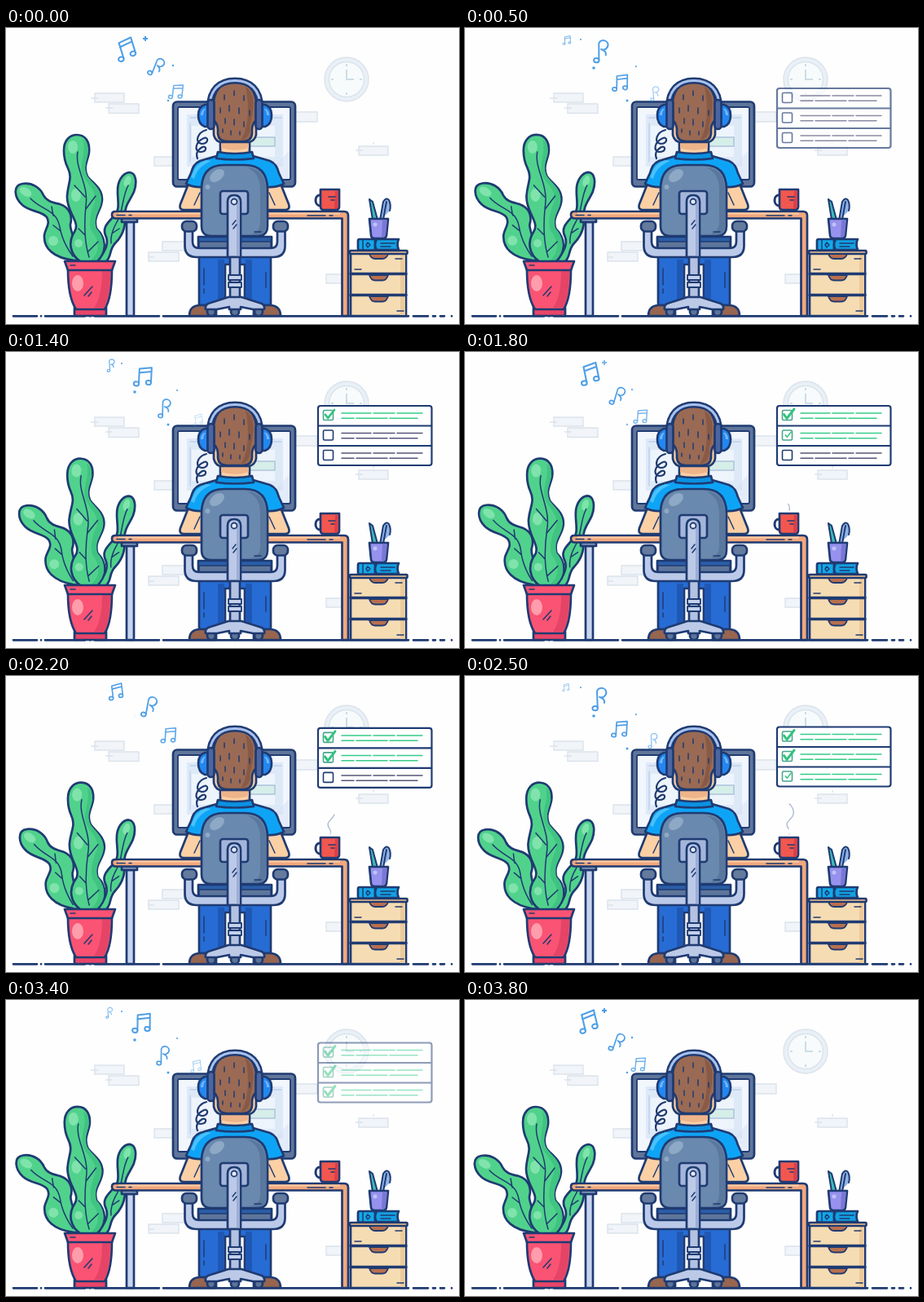
An HTML page for the animation above (3900 ms loop, 556x363 px).

```html
<!DOCTYPE html>
<html lang="en">
<head>
<meta charset="utf-8">
<title>Working at the desk</title>
<style>
html, body { margin: 0; width: 100%; height: 100%; overflow: hidden; background: #fefefe; }
svg { display: block; }
.ink { stroke: #1f3b72; stroke-width: 2.7; stroke-linejoin: round; stroke-linecap: round; }
.thin { fill: none; stroke-width: 1.5; }
.flat { stroke: none; }
.pale { fill: #f1f4f8; stroke: #dce3ec; stroke-width: 1.4; }
.note { fill: none; stroke: #4f9fe6; stroke-width: 2; stroke-linejoin: round; stroke-linecap: round; }
</style>
</head>
<body>
<svg width="556" height="363" viewBox="0 0 556 363">
  <g class="pale">
    <path d="M109 80h36v11h-36zM126 93h37v11.500h-37zM182 158h24v11h-24zM192 262h37v11h-37zM175 275h37v11h-37zM350 103h32v12h-32zM433 145h36v11h-36zM393 302h20v11h-20z"/>
    <path d="M104 86h9M122 98h9M429 150h9M174 281h8M451 140v3" fill="none"/>
    <circle cx="418" cy="63" r="27" fill="#e9f0f6"/>
    <circle cx="418" cy="63" r="21.500" fill="#f7fbfc"/>
    <path d="M418 51V63H427M418 44v3M418 79v3M399 63h3M434 63h3" fill="none" stroke="#cddde6" stroke-width="2"/>
  </g>

  <g id="panel" class="ink" fill="#fff">
    <rect x="383" y="66" width="139.500" height="73" rx="3" stroke-width="2.200"/>
    <path d="M383 90.500h139M383 115h139" stroke-width="2.200"/>
    <g id="rows"></g>
  </g>
  <path id="steam" class="thin" stroke="#b3bed2" stroke-linecap="round" pathLength="72" d="M398 194C401 187 392 186 396 179C400 174 406 171 402 162C399 154 391 155 389 160C388 165 391 168 394 167"/>

  <g class="ink" fill="#50d28c">
    <g id="leafL">
      <path d="M84 285C58 282 46 270 47 254C48 246 55 240 50 232C44 224 30 226 20 217C10 208 8 193 20 191C32 189 42 196 46 205C50 213 58 214 66 216C78 220 82 230 79 241C78 250 90 268 90 285Z"/>
      <ellipse class="flat" cx="24" cy="201" rx="8" ry="5" fill="#80e3ac" transform="rotate(30 24 201)"/>
      <circle class="flat" cx="58" cy="261" r="6" fill="#80e3ac"/>
      <path class="thin" d="M30 209C44 224 62 222 66 244Q69 262 82 280M56 219L58 230M58 242L67 249"/>
    </g>
    <g id="leafR">
      <path d="M113 286C119 276 128 266 122 254C118 244 126 238 132 231C143 222 134 204 138 191C141 181 147 177 152 177C160 178 161 190 157 201C152 212 145 218 146 232C147 246 142 256 134 264C126 272 130 282 122 287Z"/>
      <ellipse class="flat" cx="149" cy="188" rx="4" ry="7" fill="#80e3ac" transform="rotate(20 149 188)"/>
      <path class="thin" d="M150 193C142 208 144 226 136 238Q128 252 129 264M142 224L138 229M139 246L130 252"/>
    </g>
    <g id="leafC">
      <path d="M92 287C78 278 76 262 84 250C92 238 74 226 75 206C76 190 82 184 76 172C72 164 71 158 71 150C71 138 78 131 87 131C97 131 103 139 102 152C101 162 94 170 100 182C106 190 118 196 118 210C118 224 106 230 111 246C122 256 126 274 110 287Z"/>
      <path class="flat" d="M94 137C100 152 88 168 95 182C101 193 112 200 109 213C104 226 101 238 105 249C115 260 116 276 103 286H110C124 274 121 256 111 246C106 230 117 224 117 210C117 197 106 190 100 182C94 170 100 162 101 152C101 145 99 139 94 137Z" fill="#3fc481"/>
      <ellipse class="flat" cx="82" cy="146" rx="6" ry="8" fill="#80e3ac"/><ellipse class="flat" cx="86" cy="205" rx="6" ry="8" fill="#80e3ac"/><circle class="flat" cx="89" cy="264" r="5" fill="#80e3ac"/>
      <path class="thin" d="M88 152C84 172 102 192 98 218C96 238 96 262 102 281M84 193L97 207M110 206L98 222M89 246L97 254M113 262L101 274"/>
    </g>
    <path d="M84 343H123V353H84Z" fill="#e84468"/>
    <path d="M76 296H130C130 318 127 336 121 345H86C80 336 76 318 76 296Z" fill="#fa5374"/>
    <path class="flat" d="M118 298H128C128 318 125 335 120 343H108C115 334 118 318 118 298Z" fill="#e54467"/>
    <ellipse class="flat" cx="88" cy="313" rx="7" ry="10" fill="#ff9dac"/>
    <path d="M72 286H134L130 297H76Z" fill="#fa5374"/>
    <path class="thin" d="M96 328L106 317M101 329L105 324M79 291h6"/>
  </g>

  <g class="ink" fill="#60759a">
    <rect x="205" y="90.500" width="150" height="104" rx="5"/>
    <rect x="211" y="97" width="138" height="89" rx="2" fill="#e4ecf9" stroke-width="1.800"/>
    <g class="flat">
      <path d="M212 98H300L220 185H212ZM330 98H348V150L315 185H250Z" fill="#f2f6fd"/>
      <path d="M222 106H340V170H222Z" fill="#d3e1f5" opacity=".6"/>
      <path d="M228 120H330V158H228Z" fill="#eef4fc"/>
    </g>
    <path class="thin" d="M226 110H338M226 117V164" stroke="#bfd1ea"/>
    <rect x="276" y="134" width="54" height="11" fill="#d6eee8" stroke="#adc4dc" stroke-width="1.500"/>
    <path fill="none" stroke-width="2.200" d="M246 125C235 128 231 140 240 142C249 142 249 133 243 135C232 140 231 150 238 152C247 152 247 144 241 146C234 150 233 155 235 160"/>
  </g>

  <g id="sparkA" fill="#4a9fe8">
    <path d="M170 10h2v2h2v2h-2v2h-2v-2h-2v-2h2z"/>
    <circle cx="199" cy="89" r="1.200"/><circle cx="205" cy="46" r="1.200"/>
  </g>
  <g id="sparkB" fill="#4a9fe8">
    <circle cx="142" cy="14" r="1"/><circle cx="158" cy="49" r="1.800"/><circle cx="199" cy="89" r="1.500"/><circle cx="210" cy="47" r="1"/>
  </g>
  <g id="notes"></g>

  <g class="ink" fill="#f2a77c">
    <path fill="#c8d4ee" d="M148 238H157V353H148Z"/>
    <path fill="#7d90b5" d="M142 233H161V238H142Z"/>
    <path d="M134 225H415Q420 225 420 230V353H412.500V233.500H134Q130 233 130 229Q130 225 134 225Z"/>
    <path class="flat" d="M138 226.500H410V228.500H138Z" fill="#ffcba6"/>
    <path class="thin" d="M136 229.500h10M151 229.500h3M370 230h22M397 230h4"/>
  </g>

  <g class="ink" fill="#f2574f">
    <path fill="none" d="M386 205C378 204 378 218 386 218" stroke-width="3"/>
    <path d="M386 198H409V219Q409 223 405 223H390Q386 223 386 219Z"/>
    <path class="flat" d="M404 200h4v18q0 4-5 4z" fill="#d9404a"/>
    <path class="thin" d="M396 207h8M399 211h4"/>
  </g>

  <g class="ink" fill="#f6dcb3">
    <path d="M423 276H491V353H423Z"/>
    <path class="flat" d="M484 278h6v74h-6z" fill="#ebcb9b"/>
    <rect x="422" y="273" width="70.500" height="4" rx="1" fill="#f2c48f"/>
    <path d="M423 301.500H491M423 327.500H491" stroke-width="3.400"/>
    <path d="M446 277H469Q467 283 462 283H453Q448 283 446 277ZM446 303H469Q467 309.500 462 309.500H453Q448 309.500 446 303ZM446 329H469Q467 335.500 462 335.500H453Q448 335.500 446 329Z" fill="#b96f4e" stroke-width="1.800"/>
    <path class="thin" d="M428 296h8M478 283h8M480 347h8"/>
    <rect x="432" y="259" width="21" height="13.500" rx="2" fill="#12a9ea"/>
    <path d="M455 259H482Q479 265 482 272H455Q451 266 455 259Z" fill="#12a0e2"/>
    <path class="thin" d="M438 260v12M460 264h17M460 268h12"/>
    <path class="thin" d="M444 263l3 3l-3 3l-2-3z" fill="#fff"/>
    <path d="M446 210L450 213L456 235H450Z" fill="#3fb9b8" stroke-width="2"/>
    <path d="M459 236L463 213Q467 207 470 211Q473 217 471 224M467 213L463 235" fill="#8fb4e8" stroke-width="2"/>
    <path d="M446 234H469L467 254Q467 258 462 258H453Q448 258 448 254Z" fill="#9692ee"/>
    <path class="flat" d="M462 236h6l-2 18q-1 3-5 3z" fill="#7b77d4"/>
    <circle class="flat" cx="453" cy="241" r="2.500" fill="#c3c0fa"/>
  </g>

  <path class="ink" d="M9 353.300H38M43 353.300h.1M48 353.300H97M103 353.300h.1M109 353.300H188M193 353.300H494M500 353.300H518M524 353.300h3M533 353.300H538M547 353.300h.1"/>

  <g class="ink">
    <g fill="#fbd0a5">
      <path d="M224 191L214 216Q212 223 218 223H241V193ZM337 191L347 216Q349 223 343 223H320V193Z"/>
      <path class="thin" d="M238 202L231 217M323 202L330 217"/>
      <path d="M263 130H299V158H263Z"/>
      <path class="flat" d="M264 141h34v6q-17 6-34 0z" fill="#eeb48a"/>
    </g>
    <path fill="#0ea4f6" d="M262 156L238 163C231 166 229 171 227 178L221 191Q230 196 243 195H319Q332 196 341 191L335 178C333 171 331 166 324 163L300 156Z"/>
    <path class="flat" d="M246 162C234 166 231 172 227 183L231 185C234 174 240 168 252 163Z" fill="#48c1fd"/>
    <path fill="#0a91e2" d="M260 152Q281 156 302 152L304 160Q281 163 258 160Z"/>

    <path fill="#fbd0a5" d="M255 112V131Q257 139 264 140H298Q305 139 307 131V112Z"/>
    <path fill="#9a6a54" d="M255 100C253 78 264 65 281 65C298 65 309 78 307 100V113Q302 118 302 125V130Q301 139 291 139H271Q261 139 260 130V125Q260 118 255 113Z"/>
    <path class="flat" d="M294 72C309 82 303 104 300 118C300 130 297 136 288 137.500C298 125 299 94 294 72Z" fill="#885a46"/>
    <path class="thin" d="M268 82v6M280 77v6M292 83v6M263 98v6M274 95v7M286 98v7M299 101v6M269 111v6M280 112v7M292 115v6M266 124v4M276 126v5M287 127v4"/>
    <path fill="none" stroke-width="8" d="M250 97C250 76 262 64.500 281 64.500C300 64.500 312 76 312 97"/>
    <path fill="none" style="stroke:#a9c2ee;stroke-width:3" d="M250 97C250 76 262 64.500 281 64.500C300 64.500 312 76 312 97"/>
    <g id="cup">
      <path fill="#2387f2" d="M248 94H244Q236 97 236 107Q236 118 244 121H248Z"/>
      <path class="flat" d="M243 99q-4 3-4 8h3q0-5 3-8z" fill="#74b6fc"/>
      <rect x="247.500" y="88" width="8" height="36" rx="4" fill="#4a65a0"/>
    </g>
    <use href="#cup" transform="translate(562) scale(-1 1)"/>

    <path fill="#276cd4" d="M237 270H325V340H293V290H269V340H237Z"/>
    <path class="flat" d="M260 284h8v54h-8zM294 284h8v54h-8z" fill="#1f58b4"/>
    <path class="thin" d="M243 295v20M243 320v5M319 300v18"/>
    <path fill="#98654f" d="M225 353Q225 341 237 340H258V353ZM337 353Q337 341 325 340H304V353Z"/>

    <path fill="#2a5ea8" d="M236 256H326V270H236Z"/>
    <path fill="#5f769c" d="M237 262H325V270H237Z" stroke-width="1.600"/>
    <path fill="#bccaea" d="M219.500 246V267Q219.500 281 234 281H328Q342.500 281 342.500 267V246H333V262Q333 270 325 270H237Q229 270 229 262V246Z"/>
    <rect x="216" y="237" width="18" height="12.500" rx="5.500" fill="#647b9e"/>
    <rect x="328" y="237" width="18" height="12.500" rx="5.500" fill="#647b9e"/>
    <path fill="#6a89ae" d="M240 198Q240 168 268 168H293Q321 168 321 198V243Q321 255 309 255H252Q240 255 240 243Z"/>
    <path class="flat" d="M296 171Q319 173 319 198V243Q319 253 309 253H301Q312 249 312 239V198Q312 178 296 171Z" fill="#5a789e"/>
    <ellipse class="flat" cx="259" cy="181" rx="10" ry="6.500" fill="#8ea9c6" transform="rotate(-38 259 181)"/>
    <circle class="flat" cx="247.500" cy="195" r="3" fill="#8ea9c6"/>
    <path class="thin" d="M305 250h8"/>
    <rect x="263" y="200" width="34" height="28" rx="3" fill="#a3b5d9"/>
    <path fill="#bccae8" d="M272 213Q272 205 280 205Q288 205 288 213V281H272Z"/>
    <path class="flat" d="M283 208q4 2 4 6v66h-4z" fill="#9caed4"/>
    <circle cx="280" cy="213" r="3.500" fill="#e3ebf9" stroke-width="1.800"/>
    <path class="thin" d="M278 241l4-5M279 246l4-5"/>
    <path fill="#b3c2e2" d="M275 281H287V336H275Z"/>
    <path fill="#c3d0ec" d="M273 303H289V309H273ZM273 312H289V318H273Z" stroke-width="1.800"/>
    <g fill="#5d7398"><circle cx="252" cy="348" r="5"/><circle cx="281" cy="348" r="5"/><circle cx="310" cy="348" r="5"/></g>
    <path fill="#bccae8" d="M273 330H289L314 338Q318 340 317 345H303L288 342V345H274V342L259 345H245Q244 340 248 338Z"/>
  </g>
</svg>
<script>
const LOOP = 3900, GAP = LOOP / 4, FRAME = 100;
const CHECK_AT = [1150, 1700, 2400];
const $ = id => document.getElementById(id);
const clamp = v => Math.max(0, Math.min(1, v));

// Linear interpolation through rows of [time, value, value, ...].
function along(keys, t) {
  if (t <= keys[0][0]) return keys[0].slice(1);
  const i = keys.findIndex(k => k[0] >= t);
  if (i < 0) return keys[keys.length - 1].slice(1);
  const a = keys[i - 1], b = keys[i], p = (t - a[0]) / (b[0] - a[0]);
  return a.slice(1).map((v, j) => v + (b[j + 1] - v) * p);
}

// x, y, scale, rotation, opacity
const NOTE_PATH = [
  [0, 240, 87, .45, -12, 0], [200, 231, 79, .65, 0, .6], [600, 211, 79, .75, 10, .8],
  [1150, 191, 67, .85, 4, 1], [1600, 185, 48, .85, 26, 1], [2100, 167, 28, 1, 4, 1],
  [2600, 147, 26, 1.05, -14, 1], [2850, 135, 19, .8, -4, 1], [3100, 125, 15, .45, 0, .85],
  [3300, 120, 11, .2, 0, 0]
];
// y offset, opacity
const PANEL_PATH = [
  [200, 24, 0], [450, 10, .6], [700, 0, 1], [1900, 0, 1], [2400, -3.5, 1], [2550, -3.5, 1],
  [2900, -.5, 1], [3100, -.5, 1], [3400, -13.5, .5], [3650, -22, 0]
];
const STEAM_HEAD = [[1700, 0], [1800, 9], [2500, 48], [2900, 72]];
const STEAM_TAIL = [[1800, 0], [2300, 3], [2500, 8], [2900, 54], [3100, 72]];

const BEAMED = '<path d="M-5 9L-6-9L9-12L10 6M-6-4L9-7"/><ellipse cx="-8" cy="10" rx="3.200" ry="2.600"/><ellipse cx="7" cy="7" rx="3.200" ry="2.600"/>';
const SINGLE = '<path d="M-1 11L-2-6C-4-14 7-15 9-9C10-4 5 0 1-2C4-1 8 1 7 5"/><ellipse cx="-4" cy="12" rx="3.200" ry="2.600"/>';
$('notes').innerHTML = [0, 1, 2, 3].map(i => `<g class="note">${i % 2 ? SINGLE : BEAMED}</g>`).join('');
const notes = [...$('notes').children];

$('rows').innerHTML = [0, 1, 2].map(i => `<g transform="translate(0 ${i * 24.5})">
  <rect x="389.500" y="71.500" width="12" height="12" rx="1.500" stroke-width="1.600"/>
  <path class="thin" d="M412 75h36m3 0h26m3 0h31M412 81.300h15m3 0h38m3 0h34"/>
  <path fill="none" stroke-width="2.900" d="M391.500 76.500L395 81.500L404 70"/></g>`).join('');
const rows = [...$('rows').children];

function draw(t) {
  const sway = (1 - Math.cos(t / LOOP * 2 * Math.PI)) / 2;
  $('leafL').setAttribute('transform', `rotate(${3.6 * sway} 75 285)`);
  $('leafC').setAttribute('transform', `rotate(${2.2 * sway} 98 286)`);
  $('leafR').setAttribute('transform', `rotate(${-.8 * sway} 112 285)`);

  notes.forEach((note, i) => {
    const age = (t + 2600 - i * GAP + LOOP) % LOOP;
    const [x, y, scale, turn, alpha] = along(NOTE_PATH, age);
    note.setAttribute('transform', `translate(${x} ${y}) rotate(${turn}) scale(${scale})`);
    note.style.opacity = alpha;
  });
  const beat = Math.cos(t / GAP * 2 * Math.PI);
  $('sparkA').style.opacity = clamp(beat * 1.3);
  $('sparkB').style.opacity = clamp(-beat * 1.3);

  const [lift, alpha] = along(PANEL_PATH, t);
  $('panel').setAttribute('transform', `translate(0 ${lift})`);
  $('panel').style.opacity = alpha;
  rows.forEach((row, i) => {
    const p = clamp((t - CHECK_AT[i]) / 300), size = .3 + .7 * p;
    const [box, text, tick] = row.children;
    box.style.stroke = p ? '#4aa58e' : '';
    text.style.stroke = p ? '#35cc88' : '#55557a';
    tick.style.stroke = '#2fc47c';
    tick.style.opacity = p ? 1 : 0;
    tick.setAttribute('transform', `translate(395.5 78) scale(${size}) translate(-395.5 -78)`);
  });

  const [head] = along(STEAM_HEAD, t), [tail] = along(STEAM_TAIL, t);
  $('steam').style.strokeDasharray = `0 ${tail} ${head - tail} 200`;
  $('steam').style.opacity = head > tail ? 1 : 0;
}

function tick() {
  draw(Math.floor(performance.now() % LOOP / FRAME) * FRAME);
  requestAnimationFrame(tick);
}
tick();
</script>
</body>
</html>
```
